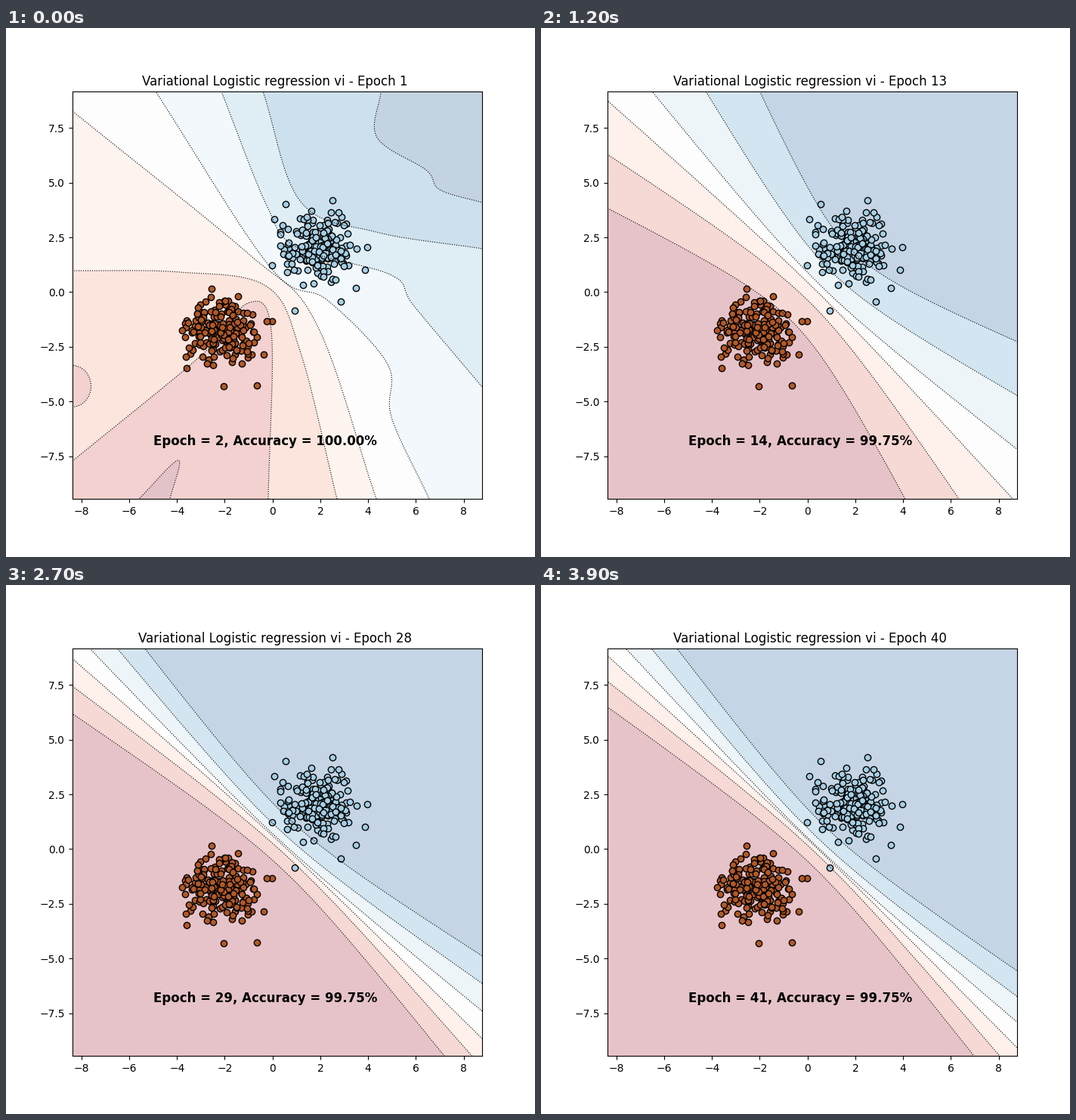
These frames come from a looping animation (700 by 700 pixels, 4000 ms). A matplotlib script:

```python
import numpy as np
import matplotlib.pyplot as plt
from matplotlib.animation import FuncAnimation
from matplotlib.patches import Ellipse, Polygon

FRAMES, INTERVAL = 40, 100
X_LIM, Y_LIM = (-8.39, 8.775), (-9.4494, 9.1721)
LEFT, RIGHT, TOP, BOTTOM = 87.5, 630, 84, 623
SAMPLES = 120
SETTLED = 5  # from here on the contours are plain conics

# Contour spacing and the drift of both ends along the axes border.
TIMES = [5, 12, 21, 27, 35, 39]
SPREAD = [1185, 475, 330, 243, 210, 226]
START = [-10, 12, 12, -1, -4, 2]
END = [36, 18, 19, 35, 32, 22]

# Key points (stage pixels) of the first contours, lowest probability first.
FIRST = [
    [(176, 623), (228, 572), (217, 623)],
    [(88, 573), (262, 430), (320, 364), (351, 400), (347, 623)],
    [(88, 321), (230, 323), (345, 342), (390, 430), (438, 623)],
    [(88, 110), (320, 298), (410, 390), (490, 623)],
    [(198, 84), (350, 317), (425, 360), (505, 445), (510, 515), (560, 623)],
    [(285, 84), (345, 235), (385, 290), (510, 327), (540, 368), (630, 475)],
    [(340, 84), (390, 230), (490, 270), (630, 292)],
    [(496, 84), (491, 145), (556, 188), (574, 214), (630, 231)]]

FINE = 0.24 + 0.08 * np.arange(8)
MEDIUM = 0.2 + 0.1 * np.arange(7)
COARSE = 0.15 + 0.15 * np.arange(6)


def to_data(points):
    x, y = np.asarray(points, float).T
    u, v = (x - LEFT) / (RIGHT - LEFT), (BOTTOM - y) / (BOTTOM - TOP)
    return np.column_stack([X_LIM[0] + u * (X_LIM[1] - X_LIM[0]),
                            Y_LIM[0] + v * (Y_LIM[1] - Y_LIM[0])])


def even(points):
    """Resample a polyline at equal steps of arc length."""
    steps = np.hypot(*np.diff(points, axis=0).T)
    dist = np.concatenate([[0], np.cumsum(steps)])
    at = np.linspace(0, dist[-1], SAMPLES)
    return np.column_stack([np.interp(at, dist, c) for c in points.T])


def spline(points):
    """Catmull-Rom curve through the points."""
    p = np.array(points, float)
    n = len(p)
    p = np.vstack([2 * p[0] - p[1], p, 2 * p[-1] - p[-2]])
    t = np.linspace(0, n - 1, 300)
    i = np.minimum(t.astype(int), n - 2)
    t = (t - i)[:, None]
    a, b, c, d = p[i], p[i + 1], p[i + 2], p[i + 3]
    return even(b + t * (c - a) / 2 + t**2 * (a - 2.5 * b + 2 * c - d / 2)
                + t**3 * (1.5 * (b - c) + (d - a) / 2))


def conic(start, end, bulge, weight=3):
    """From the top left border to the bottom right one, bent off the chord."""
    a = np.array([LEFT + max(start, 0), TOP - min(start, 0)])
    b = np.array([RIGHT + min(end, 0), BOTTOM - max(end, 0)])
    reach = bulge * (1 + weight) / weight
    c = (a + b) / 2 + reach * np.array([1, -1])
    t = np.linspace(0, 1, 300)[:, None]
    k0, k1, k2 = (1 - t)**2, 2 * weight * t * (1 - t), t**2
    return even((k0 * a + k1 * c + k2 * b) / (k0 + k1 + k2))


def extend(curve, length=120):
    """Carry both ends on in a straight line, out of the axes."""
    head, tail = curve[0] - curve[2], curve[-1] - curve[-3]
    return np.vstack([curve[0] + head / np.hypot(*head) * length, curve,
                      curve[-1] + tail / np.hypot(*tail) * length])


first_curves = np.array([spline(points) for points in FIRST])


def first_contour(p):
    """Blend the two neighbouring first contours."""
    k = np.clip((p - FINE[0]) / (FINE[1] - FINE[0]), 0, len(FINE) - 1)
    lo = min(int(k), len(FINE) - 2)
    return first_curves[lo] + (first_curves[lo + 1] - first_curves[lo]) * (k - lo)


def contour(p, i):
    spread = np.exp(np.interp(i, TIMES, np.log(SPREAD)))
    start, end = np.interp(i, TIMES, START), np.interp(i, TIMES, END)
    offset = p - 0.5
    bulge = -(7 + 0.092 * spread) * np.tanh(4 * offset)
    curve = conic(start + spread * offset, end + spread * offset, bulge)
    blend = min(i / SETTLED, 1)
    return curve * blend + first_contour(p) * (1 - blend)


def levels_for(i):
    return FINE if i < 2 else MEDIUM if i < 8 else COARSE


def band_color(k, count, alpha=0.25):
    rgb = np.array(plt.cm.RdBu((k + 0.5) / count)[:3])
    return tuple(1 - alpha + alpha * rgb)


def cluster(center, spread, outliers, total=200):
    noise = rng.normal(size=(600, 2))
    noise = noise[np.hypot(*noise.T) < 2.15][:total - len(outliers)]
    return to_data(np.vstack([noise * spread + center, outliers]))


rng = np.random.default_rng(11)
blue = cluster((411, 290), (25, 25),
               [(382, 374), (432, 228), (370, 233), (355, 253), (478, 290),
                (475, 320), (463, 344), (443, 362), (352, 314), (440, 244)])
brown = cluster((284, 403), (25, 23),
                [(288, 474), (332, 473), (272, 345), (307, 355), (352, 388),
                 (345, 388), (233, 400), (239, 450), (341, 432), (238, 435)])

fig, ax = plt.subplots(figsize=(7, 7), dpi=100)
ax.set_xlim(X_LIM)
ax.set_ylim(Y_LIM)
for points, tone in [(blue, 0.0), (brown, 1.0)]:
    ax.scatter(*points.T, color=[plt.cm.Paired(tone)], edgecolors="k", zorder=1)

fills, lines = [], []
for n in range(len(FINE)):
    fills.append(ax.add_patch(Polygon(np.zeros((3, 2)), lw=0,
                                      zorder=0.9 - 0.05 * n)))
    lines.append(ax.plot([], [], "k:", lw=0.8, zorder=2)[0])
island = ax.add_patch(Ellipse((X_LIM[0], -4.3), 1.58, 1.9, ls=":", lw=0.8,
                              ec="k", fc=band_color(1, len(FINE) + 1),
                              zorder=0.95))
title = ax.set_title("", x=0.4943)
label = ax.text(-5, -7, "", fontsize=12, fontweight="bold", zorder=3)


def update(i):
    levels = levels_for(i)
    bands = len(levels) + 1
    ax.set_facecolor(band_color(bands - 1, bands))
    for k, (fill, line) in enumerate(zip(fills, lines)):
        shown = k < len(levels)
        fill.set_visible(shown)
        line.set_visible(shown)
        if not shown:
            continue
        curve = extend(contour(levels[k], i))
        around = [(curve[-1, 0], 900), (-200, 900), (-200, curve[0, 1])]
        fill.set_xy(to_data(np.vstack([curve, around])))
        fill.set_facecolor(band_color(k, bands))
        line.set_data(*to_data(curve).T)
    island.set_visible(i == 0)
    accuracy = 100 if i == 0 else 99.75
    title.set_text(f"Variational Logistic regression vi - Epoch {i + 1}")
    label.set_text(f"Epoch = {i + 2}, Accuracy = {accuracy:.2f}%")
    return fills + lines + [island, title, label]


anim = FuncAnimation(fig, update, frames=FRAMES, interval=INTERVAL,
                     repeat=True, repeat_delay=0, blit=False)
plt.show()
```
